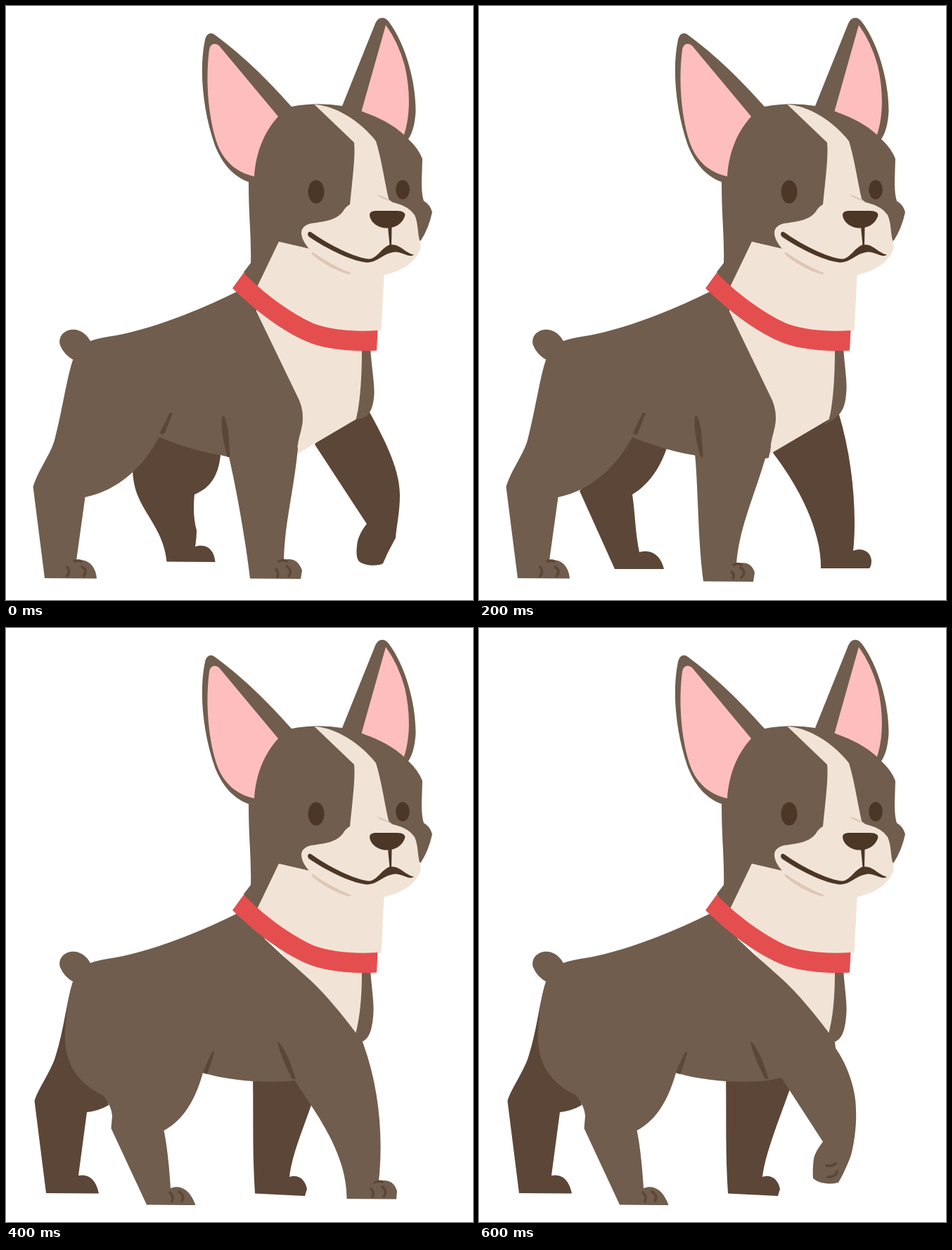
Animation of 664 by 844 pixels, one loop 800 ms. Source, as an HTML page:

```html
<!DOCTYPE html>
<html lang="en">
<head>
<meta charset="utf-8">
<title>Walking dog</title>
<style>
html, body { margin: 0; width: 100%; height: 100%; overflow: hidden; background: #fff; }
svg { display: block; width: 100%; height: 100%; }
.coat { fill: #705d4d; }
.far { fill: #5c4637; }
.cream { fill: #f1e4d7; }
.pink { fill: #ffbebe; }
.red { fill: #e54e4e; }
.ink { fill: #4c3626; }
.fold { fill: #5c4637; }
.toe { fill: none; stroke: #5c4637; stroke-width: 3.6; stroke-linecap: round; }
.shade { fill: #dfc6b6; }
</style>
</head>
<body>
<svg viewBox="0 0 664 844">
  <defs>
    <g id="torsoNear">
      <path class="coat" d="M328 406C270 435 205 459 157 468Q130 472 120 476L95 503C86 530 80 575 69 617C62 640 48 655 38.500 683L55 813L129 813.500C128 796 116 784 100 788L112.500 698C160 688 195 655 218 612.500C245 624 275 633 307 638.500L317 641L380 650L414 634C415 612 422 602 422 585Q422 568 413 552L356 434V408Z"/>
      <path class="fold" d="M236.500 579Q233 576 231 582L219.500 605Q219 609 222 609Q225 609 227 604Z"/>
      <path class="toe" d="M87 797Q92 804 87 810M97 789Q103 787 107 789M108 797Q117 802 110 810"/>
    </g>
    <path id="foldNear" class="fold" d="M307 584C310 578 314 590 316 605L318.500 640L315 641C309 620 305 600 307 584Z"/>
    <path id="chestNear" class="cream" d="M356 420L506 480C506 530 504 558 498 587L413 637L400 560L356 434Z"/>

    <path id="hindFar" class="far" d="M95 503C86 530 82 575 69 613C58 640 47 652 40.500 672L57 803L132 803.500C128 784 118 775 103 778L115 688Q132 686 146 678L130 600Z"/>
    <g id="torsoFar">
      <path class="cream" d="M370 435L506 480C506 520 504 545 498 577L480 570Z"/>
      <path class="coat" d="M506 485H518C520 512 523 530 522.500 545C521 575 515 584 506 588L497 577C504 550 506 520 506 485Z"/>
      <path class="coat" d="M328 406C270 435 205 459 157 468Q130 472 120 476L95 503C88 525 84 555 84 585C85 625 108 650 138 664Q150 679 151 693L149.500 711L200 819.500L269.500 820C262 800 250 790 234 796C232 765 229 735 224.500 714C250 700 268 675 280 632C320 644 370 647 411 643L500 600L498 576C488 562 455 520 430 498C408 478 390 463 368 442L356 408Z"/>
      <path class="fold" d="M296 603Q294 600 291 607Q284 621 280 632L286 634Q292 619 296 603Z"/>
      <path class="toe" d="M233 802Q239 808 236 815M246 801Q255 807 250 814"/>
    </g>
    <path id="foldFar" class="fold" d="M386 587Q391 590 402 612L412 641L407 641Q389 606 386 587Z"/>
  </defs>

  <g class="pose">
    <path class="far" d="M218 612L305 638C302 670 288 686 268 694C266 715 267 730 271 745Q271 757 269 768C285 763 296 772 297.500 790L228.500 789.500C225 760 215 745 200 720C188 700 181 685 180 660Z"/>
    <path class="far" d="M439 623L450 605L513 570C535 610 560 655 560 695C560 720 555 740 554 756Q543 775 536 792C530 796 512 796 503 790C497 785 498 772 500 760Q504 746 513 736Z"/>
    <use href="#chestNear"/>
    <path class="coat" d="M506 485H518C520 515 524 535 523.500 552C522 575 515 587 498 587C504 560 506 525 506 485Z"/>
    <use href="#torsoNear"/>
    <path class="coat" d="M316 636C325 675 338 740 347 813.500L419 814L421 802C416 788 407 784 395 787C396 735 410 685 415 628L380 590Z"/>
    <path class="toe" d="M384 800Q388 805 386 811M388 789Q395 786 399 789M399 796Q408 802 402 810"/>
    <use href="#foldNear"/>
  </g>

  <g class="pose">
    <path class="far" d="M218 612L267 628C258 655 242 680 218 694C222 720 222 748 228 776C245 771 258 780 263 800L193 800L143 689Z"/>
    <path class="far" d="M418 635L430 615L511 577C527 630 534 685 534 735Q534 757 532 774C546 769 557 776 558 788Q558 796 555 799L486 799C487 750 460 690 418 635Z"/>
    <use href="#chestNear"/>
    <path class="coat" d="M506 485H518C520 512 523 530 522.500 545C521 575 514 584 489 595L498 587C504 560 506 525 506 485Z"/>
    <use href="#torsoNear"/>
    <path class="coat" d="M307 636C312 690 311 760 319 817.500L390 818L392 805C388 792 378 789 366 793C369 745 390 700 407 643L412 642L415 625L380 590Z"/>
    <path class="toe" d="M359 804Q364 808 361 813M362 794Q369 791 373 794M372 798Q381 805 373 812"/>
    <use href="#foldNear"/>
  </g>

  <g class="pose">
    <use href="#hindFar"/>
    <path class="far" d="M351 635C352 690 350 745 354 803.500L425 807L428 797C425 782 414 776 403 780C406 750 423 710 434 678L411 635Z"/>
    <use href="#torsoFar"/>
    <path class="coat" d="M409 640C435 683 484 740 484.500 811L555 811.500L556 800C552 787 543 783 530 786C537 720 530 650 507 588L497 575L470 590Z"/>
    <path class="toe" d="M519 797Q524 802 521 808M524 788Q530 785 535 787M535 794Q543 800 537 808"/>
    <use href="#foldFar"/>
  </g>

  <g class="pose">
    <use href="#hindFar"/>
    <path class="far" d="M351 635C352 690 350 745 354 803.500L425 807L428 797C425 782 414 776 403 780C406 750 428 695 441 658L446 650L430 630Z"/>
    <use href="#torsoFar"/>
    <path class="coat" d="M409 643L430 639L489 730Q478 744 476 754Q474 770 475 782C484 790 500 791 511 788Q521 771 529 749C534 730 537 705 536 685C536 650 520 615 507 597L506 588L497 575L470 590Z"/>
    <path class="toe" d="M494 764Q502 765 507 761M496 780Q508 780 509 772"/>
    <use href="#foldFar"/>
  </g>

  <path class="coat" d="M121 478C115 465 103 458 92 460C80 462 74 472 77 482Q82 495 96 503Z"/>
  <path class="coat" d="M406 143Q442 136 478 142L525 25C529 15 538 14 544 22C569 55 583 110 582.500 150Q581 176 572 189Q586 202 592 217L591 250Q591 268 594 277Q603 282 606 293Q601 316 590 333L500 370L431 345L388 335L358 399L345 395L338 378L348 365C349 325 345 300 345 250C325 243 308 226 297 198C280 150 274 90 283 48C285 40 290 36 297 41C340 73 372 105 406 143Z"/>
  <path class="pink" d="M387 157L306 60C300 51 291 52 289 62C284 100 286 150 299 192C308 220 328 237 353 242C355 210 366 180 387 157Z"/>
  <path class="pink" d="M540 27L505.500 149.500C530 158 550 168 566 183C575 155 575 120 567 85Q558 52 540 27Z"/>
  <path class="cream" d="M388 335L440 347L538 375L533.500 461L500 470L420 455L357 399Z"/>
  <path class="cream" d="M438.500 140C465 141 501 160 526 192C534 218 538 248 544 274Q547 279 554 280Q573 285 581 297C586 308 585 320 588 333Q592 343 587 350C580 365 562 377 538 382L480 380L431 345C424 337 420 329 420 322C420 316 425 311 433 309C455 306 470 304 479 292Q483 285 489 282C492 250 497 215 495 194Z"/>
  <ellipse class="ink" cx="441" cy="264" rx="11.500" ry="16.500"/>
  <ellipse class="ink" cx="564" cy="261" rx="9.800" ry="13.700"/>
  <path class="shade" d="M526 268Q536 269 549 278Q536 275 526 268ZM436 349.500C452 361 472 372 491 379.500Q490 382 486 381C468 376 449 365 435 353Q434 349 436 349.500Z"/>
  <path class="ink" d="M517 297C517 291 524 291 530 291H556C564 291 569 294 567 299C563 310 553 315.500 541 315.500C530 315.500 518 308 517 297Z"/>
  <path class="ink" d="M543 314H548.500L548 340H545.500Z"/>
  <path class="ink" d="M434 321.500C460 340 497 358 516 359.500C528 359 533 344 546 339C561 338 566 350 580 353.500Q577 356 570 354C561 351 556 348 548 350.500C535 353 528 364 514 364.500C492 363 456 345 431 328C427 324 430 319 434 321.500Z"/>
  <path class="red" d="M338 379L322 401C362 440 410 475 450 484C478 490 505 491 527 489.500L528.500 461C495 463 465 461 437 451C402 435 365 407 338 379Z"/>
</svg>
<script>
const poses = document.querySelectorAll('.pose');
const STEP = 200;

function draw(now) {
  const current = Math.floor(now / STEP) % poses.length;
  poses.forEach((pose, i) => { pose.style.display = i === current ? '' : 'none'; });
}

function tick() {
  draw(performance.now());
  requestAnimationFrame(tick);
}

draw(0);
requestAnimationFrame(tick);
</script>
</body>
</html>
```
